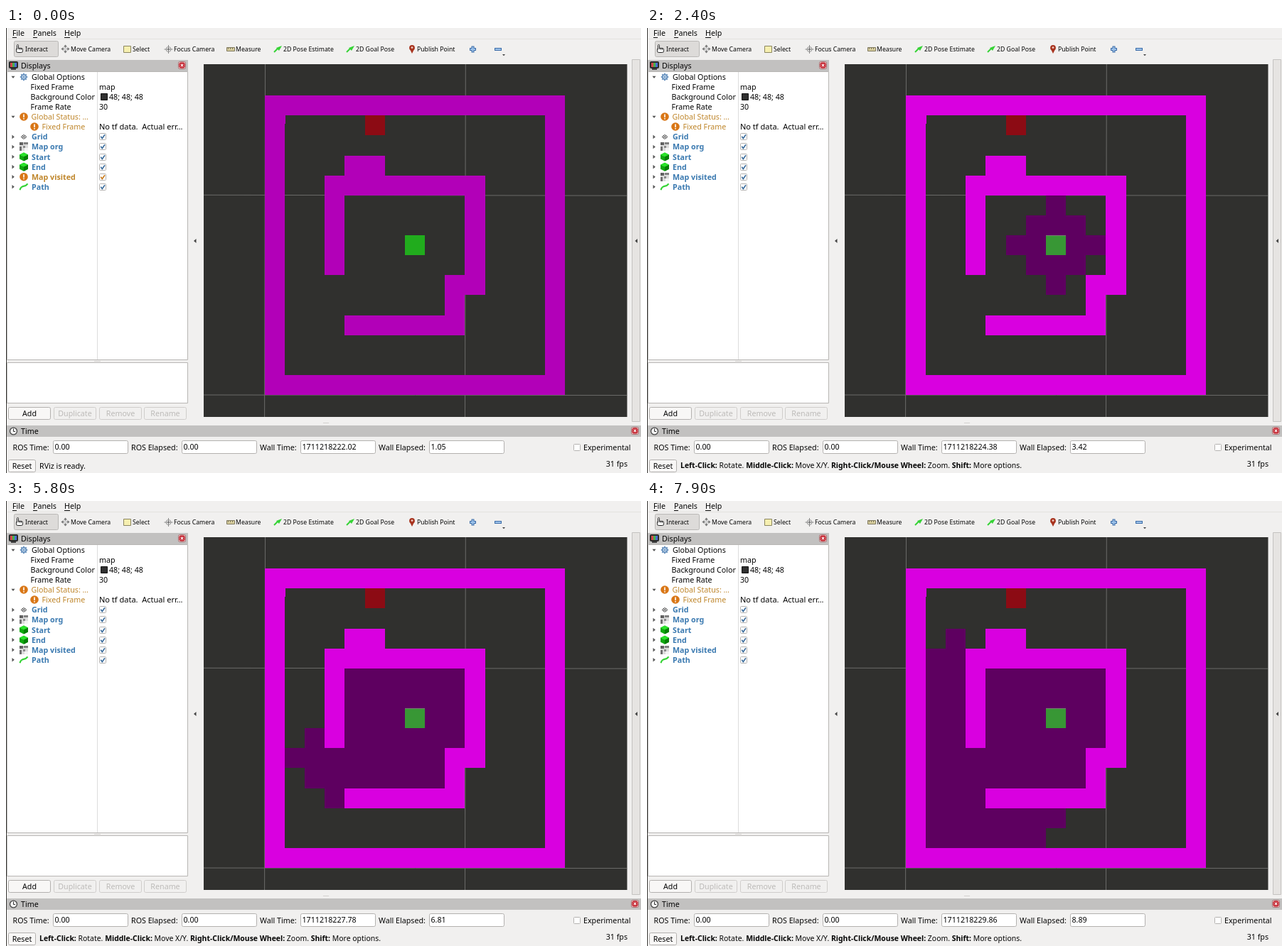
Animation, 893 px wide and 627 px high, one loop 8000 ms. Source, as an HTML page with a canvas:

```html
<!DOCTYPE html>
<html>
<head>
<meta charset="utf-8">
<style>
html, body { margin: 0; width: 893px; height: 627px; overflow: hidden; background: #f1f0ef; }
canvas { display: block; }
</style>
</head>
<body>
<canvas id="stage" width="893" height="627"></canvas>
<script>
const g = document.getElementById('stage').getContext('2d');
const LOOP = 8000;
const FONT = '"Noto Sans", "Open Sans", sans-serif';
const BG = '#f1f0ef', INK = '#050505', BLUE = '#3a79b0', ORANGE = '#bf862b';

// Stages: the hint, the walls, then one ring of cells every half second
const HINT_AT = 500, WALLS_AT = 900, SEARCH_AT = 1400, RING_MS = 500;
const CLOCK = [[0, 1.052], [1200, 2.202], [2400, 3.416], [4300, 5.306],
  [5800, 6.812], [6500, 7.512], [7900, 8.892]];
const EPOCH = 1711218220.968;

function box(x, y, w, h, fill) {
  g.fillStyle = fill;
  g.fillRect(x, y, w, h);
}

function frame(x, y, w, h, fill, edge, r = 0) {
  g.beginPath();
  g.roundRect(x + 0.5, y + 0.5, w - 1, h - 1, r);
  g.fillStyle = fill;
  g.fill();
  g.strokeStyle = edge;
  g.lineWidth = 1;
  g.stroke();
}

function line(points, color, width = 1) {
  g.beginPath();
  points.forEach(([x, y]) => g.lineTo(x, y));
  g.strokeStyle = color;
  g.lineWidth = width;
  g.stroke();
}

function poly(points, fill) {
  g.beginPath();
  points.forEach(([x, y]) => g.lineTo(x, y));
  g.fillStyle = fill;
  g.fill();
}

function disc(x, y, r, fill) {
  g.beginPath();
  g.arc(x, y, r, 0, 7);
  g.fillStyle = fill;
  g.fill();
}

function text(str, x, y, { color = INK, size = 10.7, bold = false, align = 'left' } = {}) {
  g.font = `${bold ? 'bold ' : ''}${size}px ${FONT}`;
  g.textAlign = align;
  g.fillStyle = color;
  g.fillText(str, x, Math.round(y));
  return g.measureText(str).width;
}

// Maze
const N = 15, CELL_W = 28.15, CELL_H = 28.13, MX = 363.88, MY = 95.15;
const START = [7, 7], GOAL = [5, 1];
const BLOCKS = [[0, 0, 15, 1], [0, 14, 15, 1], [0, 0, 1, 15], [14, 0, 1, 15],
  [4, 3, 2, 1], [3, 4, 8, 1], [3, 4, 1, 5], [10, 4, 1, 6], [9, 9, 1, 3], [4, 11, 6, 1]];
const isWall = (c, r) => BLOCKS.some(([x, y, w, h]) => c >= x && c < x + w && r >= y && r < y + h);

function search() {
  const dist = new Map([[START[1] * N + START[0], 0]]);
  for (const [cell, d] of dist) {
    const c = cell % N, r = Math.floor(cell / N);
    for (const [x, y] of [[c + 1, r], [c - 1, r], [c, r + 1], [c, r - 1]]) {
      const next = y * N + x;
      if (!isWall(x, y) && !dist.has(next)) dist.set(next, d + 1);
    }
  }
  return dist;
}
const rings = search();
const colX = c => Math.round(MX + c * CELL_W);
const rowY = r => Math.round(MY + r * CELL_H);

function cells(c, r, w, h, fill) {
  box(colX(c), rowY(r), colX(c + w) - colX(c), rowY(r + h) - rowY(r), fill);
}

function drawMap(t) {
  box(278, 51, 595.5, 497, '#30302e');
  const grid = '#6b6b69';
  line([[278, 235.3], [873, 236.2]], grid);
  line([[278, 517], [873, 517.5]], grid);
  line([[364.5, 51], [363.6, 548]], grid);
  line([[646.3, 51], [645.5, 548]], grid);
  const ring = Math.floor((t - SEARCH_AT) / RING_MS);
  for (const [cell, d] of rings) {
    if (d <= ring) cells(cell % N, Math.floor(cell / N), 1, 1, '#5e0060');
  }
  const wall = t < WALLS_AT ? '#b200b8' : '#d900e0';
  BLOCKS.forEach(b => cells(...b, wall));
  box(392, 123, 1, 12, wall);
  cells(...GOAL, 1, 1, '#8c0b14');
  cells(...START, 1, 1, ring < 0 ? '#21ac1d' : '#389735');
  if (ring >= 0) box(561, 292, 28, 1, '#76806f');
}

// Icons
function arrowIcon(x, y) {
  line([[x, y + 9], [x + 5, y + 4]], '#35d335', 2);
  poly([[x + 3, y + 3], [x + 11, y], [x + 7, y + 7]], '#35d335');
}

function cross(x, y) {
  frame(x, y, 11, 11, '#f3e4e4', '#a9686b', 2);
  g.beginPath();
  g.roundRect(x + 1.5, y + 1.5, 8, 8, 2);
  g.fillStyle = '#c2202b';
  g.fill();
  line([[x + 3.7, y + 3.7], [x + 7.3, y + 7.3]], '#fff', 1.2);
  line([[x + 7.3, y + 3.7], [x + 3.7, y + 7.3]], '#fff', 1.2);
}

function warn(x, y) {
  disc(x, y, 5.8, '#d97717');
  box(x - 0.8, y - 3.5, 1.6, 4.5, '#fff');
  box(x - 0.8, y + 2, 1.6, 1.6, '#fff');
}

function mapIcon(x, y) {
  box(x, y, 12, 12, '#dcdcdc');
  box(x, y, 5, 4, '#606060');
  box(x + 6, y, 6, 3, '#808080');
  box(x, y + 6, 3, 6, '#707070');
  box(x + 5, y + 5, 3, 3, '#8a8a8a');
  box(x + 7, y + 8, 5, 4, '#f4f4f4');
}

function cube(x, y) {
  poly([[x, y - 6], [x + 6, y - 3], [x + 6, y + 3], [x, y + 6], [x - 6, y + 3], [x - 6, y - 3]], '#0fa80f');
  poly([[x, y - 6], [x + 6, y - 3], [x, y], [x - 6, y - 3]], '#2be32b');
  poly([[x, y], [x + 6, y - 3], [x + 6, y + 3], [x, y + 6]], '#078007');
}

function gear(x, y) {
  for (let i = 0; i < 8; i++) {
    const a = i * Math.PI / 4;
    line([[x, y], [x + 5.2 * Math.cos(a), y + 5.2 * Math.sin(a)]], '#6a93bf', 2);
  }
  disc(x, y, 4, '#6a93bf');
  disc(x, y, 2.4, '#c7dcf0');
  disc(x, y, 1.2, '#6a93bf');
}

function gridIcon(x, y) {
  for (const k of [-1, 0, 1]) {
    line([[x - 2 + k * 2, y + 1.5 + k * 1.5], [x + 2 + k * 2, y - 1.5 + k * 1.5]], '#555');
    line([[x - 2 - k * 2, y - 1.5 + k * 1.5], [x + 2 - k * 2, y + 1.5 + k * 1.5]], '#555');
  }
}

function target(x, y) {
  g.beginPath();
  g.arc(x, y, 3.5, 0, 7);
  g.strokeStyle = '#999';
  g.lineWidth = 1;
  g.stroke();
  line([[x - 6, y], [x + 6, y]], '#888');
  line([[x, y - 6], [x, y + 6]], '#888');
  disc(x, y, 1.4, '#777');
}

function moveIcon(x, y) {
  line([[x - 5, y], [x + 5, y]], '#777', 1.3);
  line([[x, y - 5], [x, y + 5]], '#777', 1.3);
  for (const [dx, dy] of [[1, 0], [-1, 0], [0, 1], [0, -1]]) {
    const tip = [x + dx * 6, y + dy * 6], bx = x + dx * 3, by = y + dy * 3;
    poly([tip, [bx + dy * 2.5, by + dx * 2.5], [bx - dy * 2.5, by - dx * 2.5]], '#777');
  }
  box(x - 2, y - 2, 4, 4, '#d5d5d5');
}

function hand(x, y) {
  g.beginPath();
  g.roundRect(x + 1.5, y + 5.5, 9, 6, 2);
  g.roundRect(x + 2.5, y + 0.5, 2, 7, 1);
  g.fillStyle = '#fff';
  g.fill();
  g.strokeStyle = '#222';
  g.lineWidth = 1;
  g.stroke();
  box(x + 3, y + 5, 1, 3, '#fff');
  line([[x + 6.5, y + 5], [x + 6.5, y + 8]], '#222', 0.8);
  line([[x + 8.5, y + 5], [x + 8.5, y + 8]], '#222', 0.8);
}

function check(x, y, color) {
  frame(x, y, 10, 10, '#fff', '#b4b2b0', 1);
  line([[x + 2.3, y + 4.7], [x + 4.3, y + 7.5], [x + 8, y + 2.2]], color, 1.6);
}

function expander(x, y, open) {
  poly(open ? [[x - 2.5, y - 1.2], [x + 2.5, y - 1.2], [x, y + 2]]
    : [[x - 1.5, y - 2.8], [x + 1.8, y], [x - 1.5, y + 2.8]], '#555');
}

function drawToolbar() {
  [['File', 9, 6], ['Panels', 38, 6], ['Help', 82, 8]].forEach(([s, x, w]) => {
    text(s, x, 11);
    box(x, 13, w, 1, INK);
  });
  box(2, 15, 891, 1, '#e3e1df');
  frame(11, 18, 63, 23, '#dddbd9', '#b9b7b5', 2);
  const tools = [['Interact', 27], ['Move Camera', 91], ['Select', 178], ['Focus Camera', 236],
    ['Measure', 323], ['2D Pose Estimate', 390], ['2D Goal Pose', 492], ['Publish Point', 578]];
  tools.forEach(([s, x]) => text(s, x, 33, { size: 8.7 }));
  hand(13, 23);
  moveIcon(83.5, 29.5);
  frame(165, 25, 11, 10, '#f6efb0', '#8b8660');
  target(228.5, 30);
  frame(310, 27, 12, 6, '#d9cf9f', '#7d775c');
  for (let i = 0; i < 3; i++) box(312 + i * 3, 28, 1, 2, '#7d775c');
  arrowIcon(377, 25);
  arrowIcon(479, 25);
  poly([[567.5, 29], [574.5, 29], [571, 36]], '#a8341f');
  disc(571, 27.8, 3.9, '#a8341f');
  disc(571, 27.6, 1.4, '#f0d0c8');
  box(652, 28, 9, 4, '#3c6ca8');
  box(654.5, 25.5, 4, 9, '#3c6ca8');
  box(653, 29, 7, 2, '#9ec3ea');
  box(655.5, 26.5, 2, 7, '#9ec3ea');
  box(687, 28, 10, 4, '#3c6ca8');
  box(688, 29, 8, 2, '#9ec3ea');
  poly([[698, 37], [702, 37], [700, 39.3]], '#444');
}

function drawDisplays(t) {
  box(1, 45, 255, 16, '#c2c1c0');
  frame(4, 47, 13, 10, '#333', '#222', 1);
  ['#d34a4a', '#4ab04a', '#4a70d0'].forEach((c, i) => box(6 + i * 3, 49, 3, 6, c));
  box(7, 57, 7, 2, '#444');
  text('Displays', 21, 57);
  cross(242, 47);
  frame(1, 61, 255, 407, '#fff', '#b8b6b4');
  box(128, 62, 1, 405, '#dcdcdc');

  const row = i => 73 + i * 14.07;
  expander(10, 69, true);
  gear(25, 69);
  text('Global Options', 36, row(0));
  text('Fixed Frame', 34.5, row(1));
  text('map', 131, row(1));
  text('Background Color', 34.5, row(2));
  frame(133, 92, 10, 10, '#303030', '#111');
  text('48; 48; 48', 145, row(2));
  text('Frame Rate', 34.5, row(3));
  text('30', 131, row(3));
  expander(10, 125, true);
  warn(25, 125);
  text('Global Status: …', 35.5, row(4), { color: ORANGE });
  warn(40, 139);
  text('Fixed Frame', 50.5, row(5), { color: ORANGE });
  text('No tf data.  Actual err…', 131, row(5), { size: 11 });

  const waiting = t < WALLS_AT;
  ['Grid', 'Map org', 'Start', 'End', 'Map visited', 'Path'].forEach((name, i) => {
    const y = row(i + 6), mid = y - 4, late = i === 4 && waiting;
    expander(10, mid, false);
    if (i === 0) gridIcon(25, mid);
    else if (late) warn(25, mid);
    else if (i === 1 || i === 4) mapIcon(19, Math.round(mid - 6));
    else if (i < 4) cube(25, mid);
    else {
      g.beginPath();
      g.moveTo(19.5, mid + 4.5);
      g.bezierCurveTo(22, mid - 4, 26, mid + 2, 30.5, mid - 4.5);
      g.strokeStyle = '#35d335';
      g.lineWidth = 2.2;
      g.stroke();
    }
    text(name, 36, y, { color: late ? ORANGE : BLUE, bold: true });
    check(131, Math.round(mid - 5), late ? '#c87818' : '#3a6c9c');
  });

  frame(1, 471, 255, 58, '#fff', '#b8b6b4');
  box(124, 469, 9, 1, '#d3d1cf');
  [['Add', 3], ['Duplicate', 67], ['Remove', 131], ['Rename', 194]].forEach(([s, x], i) => {
    frame(x, 534, 60, 18, i ? '#f1f0ef' : '#f8f7f6', i ? '#cfcdcb' : '#b3b1af', 2);
    text(s, x + 30, 547, { align: 'center', color: i ? '#bcbab8' : INK });
  });
}

function elapsed(t) {
  const step = Math.floor(t / 100) * 100;
  let i = 1;
  while (i < CLOCK.length - 1 && step > CLOCK[i][0]) i++;
  const [t0, e0] = CLOCK[i - 1], [t1, e1] = CLOCK[i];
  return e0 + (e1 - e0) * (step - t0) / (t1 - t0);
}

function drawTime(t) {
  box(0, 560, 893, 16, '#c2c1c0');
  disc(10.5, 568, 5.6, '#444');
  disc(10.5, 568, 4.3, '#f4f4f4');
  line([[10.5, 564.5], [10.5, 568.5], [13, 568.5]], '#333');
  text('Time', 21, 572);
  cross(879, 562);

  const e = elapsed(t);
  [['ROS Time:', 9.5, 66, '0.00'], ['ROS Elapsed:', 176, 247, '0.00'],
    ['Wall Time:', 357, 414, (EPOCH + e).toFixed(2)],
    ['Wall Elapsed:', 524, 595, e.toFixed(2)]].forEach(([label, x, field, value]) => {
    text(label, x, 595);
    frame(field, 581, 106, 19, '#fff', '#b3b1af', 2);
    text(value, field + 2.5, 594);
  });
  frame(798, 586, 10, 10, '#fff', '#b4b2b0', 1);
  text('Experimental', 812, 595);

  frame(3, 608, 39, 18, '#f8f7f6', '#b3b1af', 2);
  text('Reset', 22.5, 621, { align: 'center' });
  if (t < HINT_AT) text('RViz is ready.', 47, 621);
  else {
    let x = 47;
    ['Left-Click:', ' Rotate. ', 'Middle-Click:', ' Move X/Y. ', 'Right-Click/Mouse Wheel:',
      ' Zoom. ', 'Shift:', ' More options.'].forEach((s, i) => {
      x += text(s, x, 620, { bold: i % 2 === 0, size: 10.45 });
    });
  }
  text('31 fps', 874, 618, { align: 'right' });
}

function draw(t) {
  box(0, 0, 893, 627, BG);
  drawToolbar();
  drawDisplays(t);
  drawMap(t);
  frame(880, 44, 12, 511, '#e6e4e2', '#c4c2c0');
  poly([[264, 300], [267.5, 297], [267.5, 303]], '#444');
  poly([[884.5, 300], [888, 297], [888, 303]], '#444');
  box(446, 556, 8, 1, '#d3d1cf');
  drawTime(t);
  box(0, 0, 1, 627, '#3a3936');
}

const begin = performance.now();
function tick() {
  draw((performance.now() - begin) % LOOP);
  requestAnimationFrame(tick);
}
tick();
</script>
</body>
</html>
```
